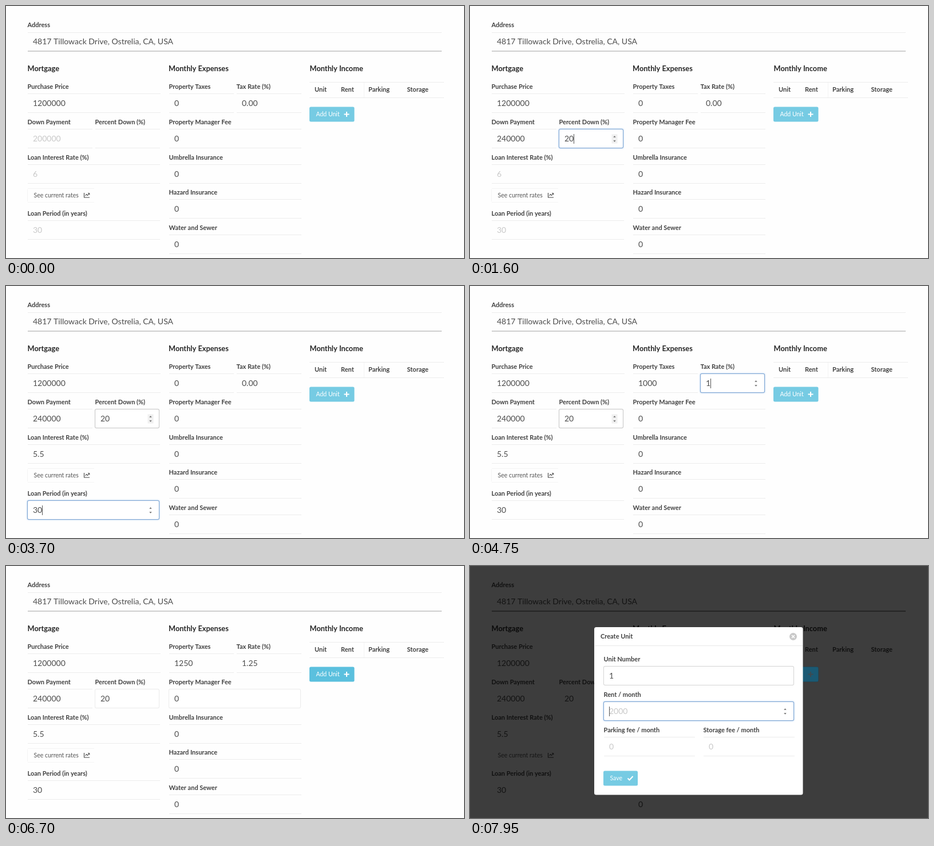
Animation, 800 px wide and 441 px high, one loop 8000 ms. Source, as an HTML page with a canvas:

```html
<!DOCTYPE html>
<html lang="en">
<head>
<meta charset="utf-8">
<title>Rental calculator</title>
<style>
  html, body { margin: 0; width: 100%; height: 100%; overflow: hidden; background: #fefefe; }
  canvas { display: block; width: 800px; height: 441px; }
</style>
</head>
<body>
<canvas id="stage"></canvas>
<script>
const W = 800, H = 441, LOOP = 8000, FADE = 120;
const MODAL_AT = 6750, HOVER_AT = 6350;
const FAMILY = 'Lato, "Open Sans", sans-serif';
const INPUT = `400 14px ${FAMILY}`;
const LABEL = `700 11px ${FAMILY}`;
const HEAD = `700 12.8px ${FAMILY}`;
const SMALL = `400 10.5px ${FAMILY}`;
const INK = '#4c4c4c', LABEL_INK = '#404040', LINE = '#ececec';

const canvas = document.getElementById('stage');
const ctx = canvas.getContext('2d');
const dpr = window.devicePixelRatio || 1;
canvas.width = W * dpr;
canvas.height = H * dpr;

// focus, hover: [from, to]; edits: [time, text] pairs; hint: placeholder; rim: border once visited
const field = (label, x, y, w, opts) => ({ label, x, y, w, h: 32, edits: [], value: '', hint: '', ...opts });

const form = [
  field('Purchase Price', 37, 154, 232, { value: '1200000' }),
  field('Down Payment', 37, 216, 113, { hint: '200000', edits: [[1200, '24000'], [1400, '240000']] }),
  field('Percent Down (%)', 155, 216, 113, {
    focus: [800, 1900], hover: [800, 5950], rim: '#ebebeb', spin: true,
    edits: [[1200, '2'], [1400, '20']] }),
  field('Loan Interest Rate (%)', 37, 278, 231, {
    hint: '6', focus: [1900, 2850], spin: true, edits: [[2200, '5'], [2400, '5.'], [2600, '5.5']] }),
  field('Loan Period (in years)', 37, 376, 231, {
    hint: '30', focus: [2850, 3950], spin: true, edits: [[3600, '3'], [3700, '30']] }),
  field('Property Taxes', 284, 154, 113, {
    value: '0', focus: [3950, 4250], spin: true, edits: [[4650, '1000'], [5000, '1200'], [5100, '1250']] }),
  field('Tax Rate (%)', 402, 154, 113, {
    value: '0.00', focus: [4250, 5880], spin: true,
    edits: [[4650, '1'], [4850, '1.'], [5000, '1.2'], [5100, '1.25']] }),
  field('Property Manager Fee', 284, 216, 231, {
    value: '0', focus: [5880, 6500], rim: '#ebebeb', spin: true }),
  field('Umbrella Insurance', 284, 278, 231, { value: '0' }),
  field('Hazard Insurance', 284, 339, 231, { value: '0' }),
  field('Water and Sewer', 284, 401, 231, { value: '0' })
];

const dialog = [
  field('Unit Number', 233, 176, 333, {
    hint: '101', focus: [6600, 7500], rim: '#d4d4d4', edits: [[7050, '1']] }),
  field('Rent / month', 233, 238, 333, { hint: '2000', focus: [7500, 8200], spin: true }),
  field('Parking fee / month', 233, 300, 159, { hint: '0' }),
  field('Storage fee / month', 407, 300, 159, { hint: '0' })
];

const clamp = v => Math.max(0, Math.min(1, v));
const within = (span, t) => Boolean(span) && t >= span[0] && t < span[1];

function text(str, x, mid, font, color) {
  ctx.font = font;
  ctx.fillStyle = color;
  ctx.fillText(str, x, mid);
}

function rect(x, y, w, h, color) {
  ctx.fillStyle = color;
  ctx.fillRect(x, y, w, h);
}

function box(x, y, w, h, r, color) {
  ctx.beginPath();
  ctx.roundRect(x, y, w, h, r);
  ctx.fillStyle = color;
  ctx.fill();
}

function path(points, color, width) {
  ctx.beginPath();
  points.forEach(([x, y], i) => i ? ctx.lineTo(x, y) : ctx.moveTo(x, y));
  ctx.strokeStyle = color;
  ctx.lineWidth = width;
  ctx.stroke();
}

function plus(color) {
  rect(590.5, 188.5, 9, 2, color);
  rect(594, 185, 2, 9, color);
}

function spinner(x, mid, shaded) {
  if (shaded) rect(x - 5, mid - 8, 10, 16, '#f0f0f0');
  ctx.fillStyle = '#666';
  for (const d of [-1, 1]) {
    ctx.beginPath();
    ctx.moveTo(x - 2.2, mid + d * 2.7);
    ctx.lineTo(x + 2.2, mid + d * 2.7);
    ctx.lineTo(x, mid + d * 5.3);
    ctx.fill();
  }
}

function focusLevel(f, t) {
  if (!f.focus || t < f.focus[0]) return 0;
  const [from, to] = f.focus;
  return clamp((t - from + 40) / FADE) * (1 - clamp((t - to) / FADE));
}

function drawBorder(f, t, level) {
  const { x, y, w, h } = f;
  const hovered = within(f.hover, t);
  const rim = hovered ? '#c4c4c4' : f.rim && t >= f.focus[0] && f.rim;
  if (level < 1) {
    if (rim) {
      box(x, y - 1, w, h + 2, 3, rim);
      box(x + 1, y, w - 2, h, 2, '#fff');
    } else {
      rect(x + 1, y - 1, w, 1, LINE);
      rect(x + 1, y + h, w, 1, LINE);
    }
  }
  if (level > 0) {
    ctx.save();
    ctx.globalAlpha = level;
    ctx.shadowColor = 'rgba(100, 160, 225, 0.6)';
    ctx.shadowBlur = 3 * dpr;
    box(x, y - 1, w, h + 2, 3, '#7ba3d2');
    ctx.shadowColor = 'transparent';
    box(x + 1, y, w - 2, h, 2, '#fff');
    ctx.restore();
  }
  if (f.spin && (hovered || level > 0.5)) spinner(x + w - 15.5, y + 16.5, hovered);
}

function drawField(f, t, plain) {
  const mid = f.y + 16.5, left = f.x + 10;
  text(f.label, f.x + 0.5, f.y - 12.5, LABEL, LABEL_INK);
  if (!plain) drawBorder(f, t, focusLevel(f, t));

  let value = f.value, since = f.focus ? f.focus[0] : 0, edited = false;
  for (const [at, str] of f.edits) {
    if (t >= at) { value = str; since = at; edited = true; }
  }
  ctx.font = INPUT;
  const width = ctx.measureText(value).width;
  const active = !plain && within(f.focus, t);
  const selected = active && !edited && value;
  if (selected) rect(left, mid - 8.5, width, 17, '#b4d5fe');
  text(value || f.hint, left, mid, INPUT, value ? INK : '#c8c8c8');
  if (active && !selected && (t - since) % 1000 < 500) {
    rect(Math.floor(left + width), mid - 8.5, 1, 17, '#555');
  }
}

function button(x, y, w, label, color) {
  box(x, y, w, 26, 2.5, color);
  text(label, x + 11.5, y + 13, SMALL, '#fff');
}

function drawPage(t, plain) {
  rect(0, 0, W, H, '#fefefe');
  text('Address', 37.5, 33.5, LABEL, LABEL_INK);
  if (!plain) rect(38, 46, 723, 1, LINE);
  rect(38, 78.5, 723, 1, plain ? '#333' : '#a2a2a2');
  text('4817 Tillowack Drive, Ostrelia, CA, USA', 47, 63, INPUT, INK);

  text('Mortgage', 37.5, 110.5, HEAD, '#262626');
  text('Monthly Expenses', 284, 110.5, HEAD, '#262626');
  text('Monthly Income', 530.5, 110.5, HEAD, '#262626');
  for (const f of form) drawField(f, t, plain);

  if (!plain) {
    rect(38, 319, 116, 1, '#f4f4f4');
    rect(38, 343, 116, 1, '#f4f4f4');
    rect(37, 321, 1, 21, '#f4f4f4');
    rect(530, 133, 235, 1, LINE);
    rect(530, 160, 235, 1, LINE);
    rect(625, 134, 1, 26, '#f4f4f4');
  }
  text('See current rates', 48.5, 331.5, SMALL, '#555');
  path([[136.5, 327], [136.5, 335], [146, 335]], '#444', 1.1);
  path([[138.5, 332], [140.5, 329.5], [142.5, 331.5], [145.5, 328]], '#444', 1.1);
  path([[143, 327.7], [145.8, 327.7], [145.8, 330.5]], '#444', 1);

  const heads = { Unit: 539, Rent: 585, Parking: 633, Storage: 700.5 };
  for (const name in heads) text(name, heads[name], 147, LABEL, LABEL_INK);
  button(530, 176.5, 78.5, 'Add Unit', t >= HOVER_AT ? '#5bc0de' : '#76cbe3');
  plus('#fff');
}

function drawDialog(t) {
  rect(0, 0, W, H, 'rgba(0, 0, 0, 0.76)');
  box(530, 176.5, 78.5, 26, 2.5, '#1b5a74');
  plus('#3d4a50');

  box(217, 107, 364.5, 293.5, 3.5, '#fff');
  text('Create Unit', 228, 124, LABEL, LABEL_INK);
  rect(218, 139, 363, 1, '#e8e8e8');
  ctx.beginPath();
  ctx.arc(564.5, 123.5, 6.5, 0, Math.PI * 2);
  ctx.fillStyle = '#c9c9c9';
  ctx.fill();
  path([[562, 121], [567, 126]], '#fff', 1.6);
  path([[567, 121], [562, 126]], '#fff', 1.6);

  for (const f of dialog) drawField(f, t, false);
  button(233, 358.5, 60, 'Save', '#76cbe3');
  path([[275.5, 371.5], [278.5, 374.5], [284.5, 368]], '#fff', 2);
}

function frame(now) {
  const t = now % LOOP;
  ctx.setTransform(dpr, 0, 0, dpr, 0, 0);
  ctx.textBaseline = 'middle';
  const open = t >= MODAL_AT;
  drawPage(t, open);
  if (open) drawDialog(t);
}

const start = performance.now();
function tick() {
  frame(performance.now() - start);
  requestAnimationFrame(tick);
}
tick();
</script>
</body>
</html>
```
